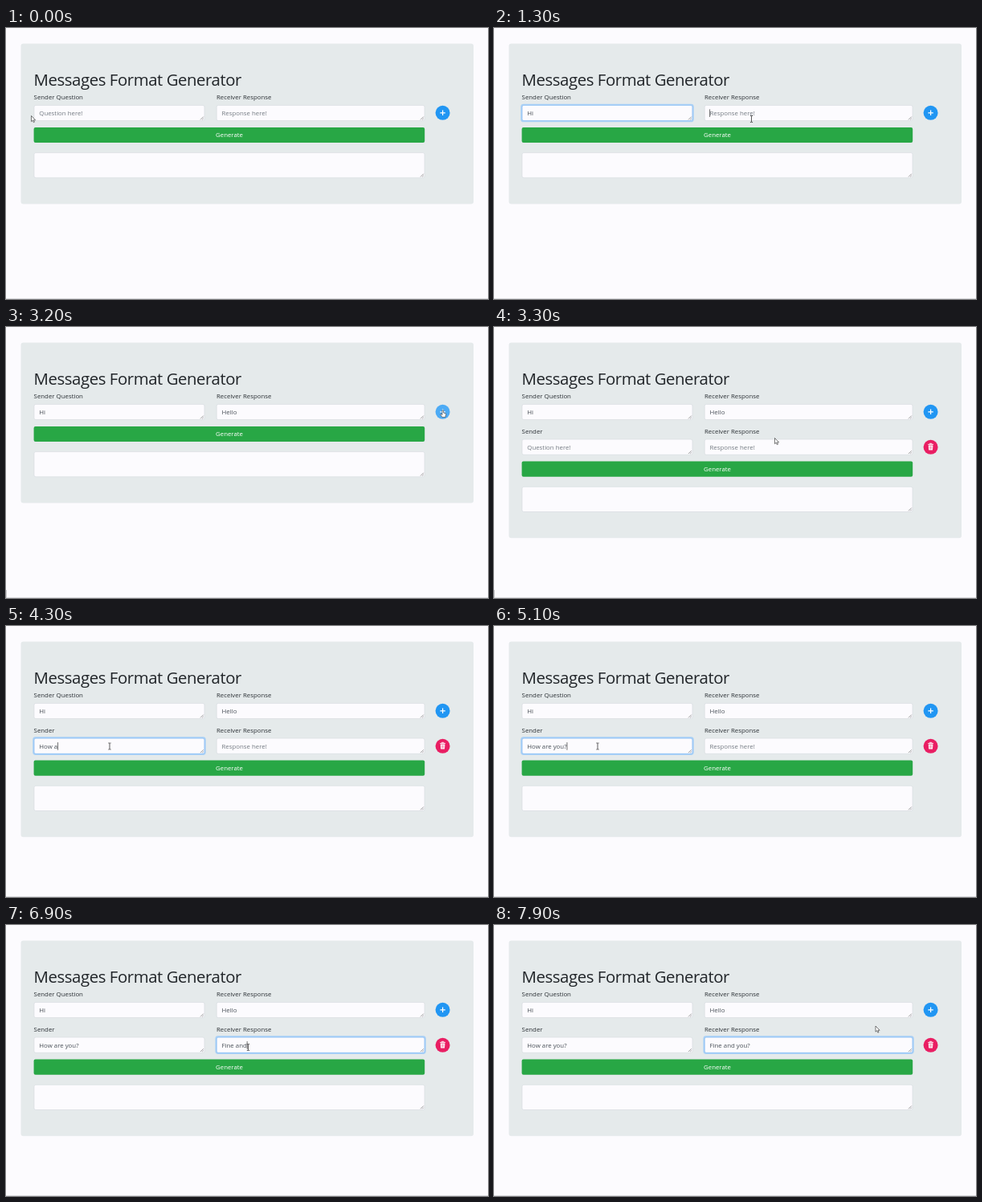
Recreate the animation shown at these times as an HTML page. Size 600x338 px, loop 8000 ms.

```html
<!DOCTYPE html>
<html lang="en">
<head>
<meta charset="utf-8">
<title>Messages Format Generator</title>
<style>
  html, body { margin: 0; width: 100%; height: 100%; overflow: hidden; background: #fcfbfe; }
  svg { display: block; width: 600px; height: 338px; }
  text { font: 7.85px "Open Sans", "Noto Sans", sans-serif; fill: #2b3035; white-space: pre; }
  .title { font-size: 20.4px; font-weight: 500; letter-spacing: -.45px; fill: #212529; }
  .field { fill: #fcfbfe; stroke: #d3d9de; stroke-width: .6; }
  .ring { fill: none; stroke: #a9d0f5; stroke-width: 1.7; }
  .edge { fill: none; stroke: #80bdff; stroke-width: .6; }
  .value { fill: #495057; }
  .value.empty { fill: #747b82; }
  .caret { stroke: #333; stroke-width: .7; }
  .grip { stroke: #777; stroke-width: .7; }
  .go { fill: #fff; text-anchor: middle; }
</style>
</head>
<body>
<svg viewBox="0 0 600 338">
  <defs>
    <path id="grip" class="grip" d="M-5 -1.2L-1.2 -5M-2.8 -1.2L-1.2 -2.8"/>
    <g id="arrow"><path d="M0 0V7.2L1.7 5.7L2.8 8.2L4 7.7L2.9 5.3H5.1Z" fill="#fff" stroke="#333" stroke-width=".65"/></g>
    <g id="beam"><path d="M-1.6 -4H-.4L0 -3.6L.4 -4H1.6M0 -3.6V3.6M-1.6 4H-.4L0 3.6L.4 4H1.6" fill="none" stroke="#333" stroke-width=".8"/></g>
    <g id="hand"><path d="M-.6 -4Q.4 -5 1 -3.8V-1L3.6 -.3Q4.2 0 4 1.2L3.3 4.4H-.7L-2.8 1.2Q-2.6 .1 -1.5 .7L-.6 1.6Z" fill="#fff" stroke="#333" stroke-width=".6"/></g>
  </defs>
  <rect id="panel" x="18.5" y="19.5" width="563.5" height="200" rx="3" fill="#e5eaeb"/>
  <path d="M0 337.5H600" stroke="#dcdce0"/>
  <path id="tip" d="M.5 328V338" stroke="#c9c9cd"/>
  <text class="title" x="34.6" y="72.3">Messages Format Generator</text>
  <text x="34.6" y="89.3">Sender Question</text>
  <text x="262" y="89.3">Receiver Response</text>
  <g id="row2">
    <text x="34.6" y="132.9">Sender</text>
    <text x="262" y="132.9">Receiver Response</text>
    <circle cx="543.6" cy="149.8" r="9" fill="#e91e63"/>
    <path d="M540.2 146.4H547M542.4 146V145.3H544.8V146" fill="none" stroke="#fff" stroke-width=".9"/>
    <path d="M540.8 147.4H546.4L546 153.6H541.2Z" fill="#fff"/>
    <path d="M542.4 148.6V152.4M543.6 148.6V152.4M544.8 148.6V152.4" stroke="#e91e63" stroke-width=".4"/>
  </g>
  <circle id="plus" cx="543.6" cy="105.8" r="9"/>
  <path d="M540.4 105.8H546.8M543.6 102.6V109" stroke="#fff" stroke-width="1.2"/>
  <g id="fields"></g>
  <g id="lower">
    <rect x="34.6" y="123.9" width="486.6" height="19.2" rx="2" fill="#28a745"/>
    <text class="go" x="278" y="136.4">Generate</text>
    <rect class="field" x="35" y="155.6" width="486" height="31.2" rx="2"/>
    <use href="#grip" x="521" y="186.8"/>
  </g>
  <use id="pointer"/>
</svg>
<script>
const LOOP = 8000, STEP = 100, SHIFT = 43.7;
const $ = id => document.getElementById(id);

// keys: [time, text]; focus: [start, end]; caret: list of [start, end]
const fields = [
  { x: 35, w: 212, y: 96.4, hint: "Question here!", focus: [200, 1400], caret: [[400, 1000]],
    keys: [[600, "H"], [700, "Hi"]] },
  { x: 262.2, w: 258.8, y: 96.4, hint: "Response here!", focus: [1400, 3100], caret: [[1300, 2300]],
    keys: typing(1600, "Hello", 5) },
  { x: 35, w: 212, y: 140.1, hint: "Question here!", focus: [3800, 5900], caret: [[3800, 5400]], row2: true,
    keys: [...typing(3900, "How a", 5), [4600, "How ar"], [4700, "How are"],
           ...typing(4800, "y", 1, "How are "), ...typing(4900, "ou?", 3, "How are y")] },
  { x: 262.2, w: 258.8, y: 140.1, hint: "Response here!", focus: [5900, LOOP], caret: [[5900, 7500]], row2: true,
    keys: [[6200, "F"], ...typing(6400, "ine", 3, "F"), ...typing(6700, "and", 3, "Fine "),
           ...typing(7000, "you", 3, "Fine and "), [7500, "Fine and you?"]] }
];

// pointer stops: [time, x, y]
const path = [
  [0, 31.5, 109.5], [100, 44, 115], [200, 70, 116], [400, 112, 107], [900, 112, 107],
  [1100, 200, 94], [1300, 320.5, 113.5], [2200, 320.5, 113.5], [2500, 385, 92],
  [2700, 450, 81], [2900, 520, 98], [3100, 543.6, 108], [3200, 543.6, 108],
  [3300, 349.5, 138.5], [3600, 129, 150], [5600, 129, 150], [5800, 240, 162],
  [6000, 301.5, 152.5], [7600, 301.5, 152.5], [7900, 475, 126], [LOOP, 475, 126]
];

function typing(start, text, count, before = "") {
  return Array.from({ length: count }, (_, i) => [start + i * STEP, before + text.slice(0, i + 1)]);
}

function add(parent, tag, attrs) {
  const el = document.createElementNS("http://www.w3.org/2000/svg", tag);
  for (const k in attrs) el.setAttribute(k, attrs[k]);
  return parent.appendChild(el);
}

for (const f of fields) {
  const { x, y, w } = f, h = 19.2;
  f.g = add($("fields"), "g", {});
  add(f.g, "rect", { class: "field", x, y, width: w, height: h, rx: 2 });
  f.ring = add(f.g, "g", {});
  add(f.ring, "rect", { class: "ring", x: x - .9, y: y - .9, width: w + 1.8, height: h + 1.8, rx: 2.6 });
  add(f.ring, "rect", { class: "edge", x, y, width: w, height: h, rx: 2 });
  add(f.g, "use", { href: "#grip", x: x + w, y: y + h });
  f.text = add(f.g, "text", { x: x + 6.3, y: y + 12.4 });
  f.bar = add(f.g, "path", { class: "caret" });
}

const within = (t, [a, b]) => t >= a && t < b;
const show = (el, on) => el.setAttribute("visibility", on ? "visible" : "hidden");

function drawField(f, t) {
  f.g.style.display = f.row2 && t < 3300 ? "none" : "";
  let value = "";
  for (const [at, s] of f.keys) if (t >= at) value = s;
  f.text.textContent = value || f.hint;
  f.text.setAttribute("class", value ? "value" : "value empty");
  f.ring.style.opacity = within(t, f.focus) ? Math.min(1, (t - f.focus[0] + STEP) / 200) : 0;
  const on = f.caret.some(c => within(t, c));
  f.bar.style.display = on ? "" : "none";
  if (on) {
    const cx = f.x + 6.4 + (value ? f.text.getComputedTextLength() + .3 : 0);
    f.bar.setAttribute("d", `M${cx} ${f.y + 5}v9.6`);
  }
}

function pointerAt(t) {
  const i = Math.max(1, path.findIndex(p => p[0] >= t));
  const [a, x0, y0] = path[i - 1], [b, x1, y1] = path[i];
  const k = (t - a) / (b - a);
  return [x0 + (x1 - x0) * k, y0 + (y1 - y0) * k];
}

function draw(now) {
  const t = Math.floor(now % LOOP / STEP) * STEP;
  const open = t >= 3300;
  const [x, y] = pointerAt(t);
  fields.forEach(f => drawField(f, t));
  $("lower").setAttribute("transform", `translate(0 ${open ? SHIFT : 0})`);
  $("panel").setAttribute("height", open ? 200 + SHIFT : 200);
  $("row2").style.display = open ? "" : "none";
  const hover = within(t, [3000, 3300]);
  $("plus").setAttribute("fill", hover ? "#4dabf5" : "#2196f3");
  show($("tip"), within(t, [3200, 3500]));
  const overField = fields.some(f => (!f.row2 || open) &&
    x > f.x && x < f.x + f.w && y > f.y && y < f.y + 19.2);
  $("pointer").setAttribute("href", hover ? "#hand" : overField ? "#beam" : "#arrow");
  $("pointer").setAttribute("transform", `translate(${x} ${y})`);
}

function tick(now) {
  draw(now);
  requestAnimationFrame(tick);
}
draw(0);
requestAnimationFrame(tick);
</script>
</body>
</html>
```
